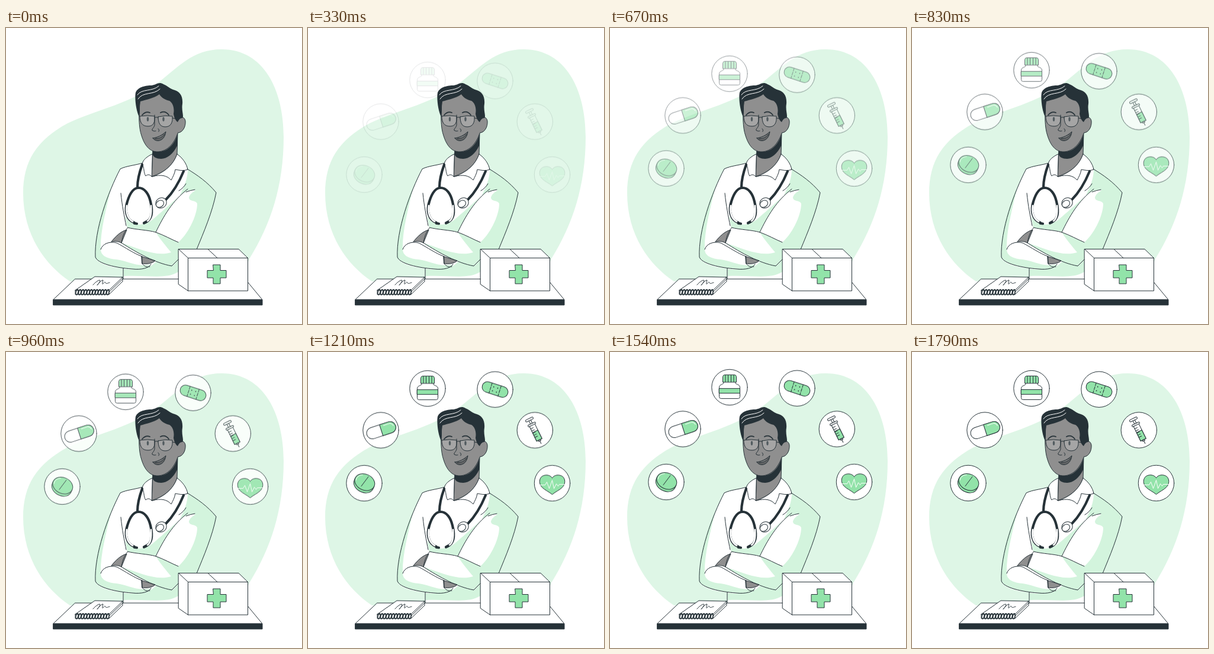
An HTML page that plays this animation: 500 by 500 pixels, repeating every 1.83 s.

```html
<!DOCTYPE html>
<html lang="en">
<head>
<meta charset="utf-8">
<title>Doctor</title>
<style>
  html, body { margin: 0; width: 100%; height: 100%; overflow: hidden; background: #fff; }
  svg { display: block; width: 100vw; height: 100vh; }
  .line { fill: none; stroke: #263238; stroke-width: 1; stroke-linecap: round; stroke-linejoin: round; }
  .white { fill: #fff; }
  .green { fill: #92e3a9; }
  .pale { fill: #def6e6; }
  .shade { fill: #d3f4dd; }
  .skin { fill: #8f8f8f; }
  .dark { fill: #263238; }
  .tube { fill: none; stroke: #263238; stroke-width: 4.2; stroke-linecap: round; }
  .thin { stroke: #fff; stroke-width: 2.6; }
  .thick { stroke-width: 1.8; }
  .shine { fill: none; stroke: #fff; stroke-width: 1; stroke-linecap: round; stroke-linejoin: round; }
  #icons { opacity: 0; }
</style>
</head>
<body>
<svg viewBox="0 0 500 500">
  <path class="pale" d="M108 428C66 400 29 349 29 279C29 225 52 189 104 161C150 139 219 125 260 90C289 68 315 36 364 36C436 36 469 105 469 184C469 267 447 332 411 390L395 430Z"/>

  <g id="icons">
    <g transform="translate(95 221.5)">
      <circle class="line white" r="30.2"/>
      <g transform="rotate(24)">
        <path class="line green" d="M-17.5 -2V2C-17 11 -8 15.500 1 15.500C10 15.500 17.500 10 17.500 2V-2Z"/>
        <ellipse class="line green" cy="-2" rx="17.500" ry="13.500"/>
      </g>
      <path class="line" d="M-5 5L7 -11"/>
      <path class="shine" d="M-14 -5C-13 -11 -8 -14 -3 -14"/>
    </g>

    <g transform="translate(123 132)">
      <circle class="line white" r="30.2"/>
      <g transform="translate(.7 0) rotate(-18)">
        <rect class="line white" x="-25.500" y="-9.700" width="51" height="19.400" rx="9.700"/>
        <path class="line green" d="M0 -9.700H15.800A9.700 9.700 0 0 1 15.800 9.700H0Z"/>
        <path class="shine" d="M6 -6.500H16C19 -6.500 21 -4 22 -1"/>
      </g>
    </g>

    <g transform="translate(202 61.500)">
      <circle class="line white" r="30.2"/>
      <path class="line white" d="M-10 -10H10V-7C10 -5 17.500 -5 17.500 0V16Q17.500 19 14.500 19H-14.500Q-17.500 19 -17.500 16V0C-17.500 -5 -10 -5 -10 -7Z"/>
      <path class="line green" d="M-17.500 2H17.500V10H-17.500Z"/>
      <path class="line green" d="M-11.500 -9V-18Q-11 -21 -8 -21H8Q11 -21 11.500 -18V-9Z"/>
      <path class="line" d="M-7 -20V-9M-2.500 -20V-9M2.500 -20V-9M7 -20V-9"/>
    </g>

    <g transform="translate(316 63.200)">
      <circle class="line white" r="30.2"/>
      <g transform="rotate(18)">
        <rect class="line green" x="-22.500" y="-9" width="45" height="18" rx="9"/>
        <path class="line" stroke-dasharray="5 2" d="M-8 -9V9M8 -9V9"/>
        <g class="dark"><circle cx="-3.500" cy="-3.500" r=".9"/><circle cx="3.500" cy="-3.500" r=".9"/><circle cx="-3.500" cy="3.500" r=".9"/><circle cx="3.500" cy="3.500" r=".9"/></g>
      </g>
    </g>

    <g transform="translate(383.300 132)">
      <circle class="line white" r="30.2"/>
      <g transform="translate(0 1) rotate(-26)">
        <path class="line white" d="M-1.700 -20H1.700V-11H-1.700Z"/>
        <rect class="line white" x="-7" y="-23" width="14" height="3.500" rx="1.700"/>
        <rect class="line white" x="-5" y="-11" width="10" height="28"/>
        <path class="line green" d="M-5 1H5V17H-5Z"/>
        <rect class="line white" x="-7" y="-13.500" width="14" height="3" rx="1.500"/>
        <path class="line" d="M-5 -6H0M-5 -2H0M-5 2H0M-5 6H0M-5 10H0M-2 17H2V19H-2ZM0 19V24"/>
      </g>
    </g>

    <g transform="translate(412.500 221.500)">
      <circle class="line white" r="30.2"/>
      <path class="line green" d="M0 -9C4 -15 13 -15 18 -11C23 -6 22 2 17 7C12 12 6 14 0 19C-6 14 -12 12 -17 7C-22 2 -23 -6 -18 -11C-13 -15 -4 -15 0 -9Z"/>
      <path class="shine" d="M-21 3H-12L-9 -2L-5 9L0 -5L3 9L7 1L10 5L12 2H21"/>
    </g>
  </g>

  <!-- coat -->
  <path class="white" d="M231 227C218 232 203 233 193 238C172 278 149 342 151 387C155 398 175 404 199 406L198 425H300V375H322C333 345 349 310 355 278C340 260 324 249 306 238L289 213L246 215Z"/>
  <path class="shade" d="M307 239C326 249 341 261 355 278C349 310 334 345 322 374H291V362C306 350 323 318 323 297C321 290 309 294 309 286C311 280 316 277 320 274C311 272 303 276 294 282C301 268 307 254 307 239Z"/>
  <path class="shade" d="M201 318C213 337 231 334 246 325C259 314 275 300 302 275C281 292 266 318 253 344L205 337Z"/>
  <path class="shade" d="M178 268C162 304 149 346 151 387C155 398 185 405 213 407C230 409 242 405 245 399C222 405 205 393 187 391C172 390 160 385 160 374C159 345 168 310 178 268Z"/>
  <path class="shade" d="M199 407C222 410 243 407 253 395L281 402L291 392V412C270 425 240 417 199 419Z"/>
  <path class="shade" d="M195 363C222 381 252 397 280 402L291 392V362L253 345C261 358 270 368 279 379C255 387 225 373 195 363Z"/>

  <!-- neck and collar -->
  <path class="skin line" d="M248 203L246 251C268 244 283 231 289 213L290 176Z"/>
  <path class="dark" d="M248 205C252 210 260 210 268 207C279 202 286 192 290 179L289 199C283 212 272 221 262 221C254 221 249 218 248 214Z"/>
  <path class="line white" d="M247 213C238 217 231 223 230 230C234 236 232 244 236 250C239 247 243 247 246 251Z"/>
  <path class="line white" d="M289 213C298 219 305 229 307 239C299 242 292 240 286 239C285 246 282 251 279 257C272 249 262 247 247 251C268 244 283 231 289 213Z"/>

  <!-- head -->
  <path class="line skin" d="M288 153C292 148 302 149 303 157C304 167 298 178 289 177Z"/>
  <path class="skin" d="M226 122C224 146 224 168 229 182C234 198 242 208 254 209C271 210 284 196 290 178L291 150L282 118L258 108Z"/>
  <path class="line" d="M226 125C224 146 224 168 229 182C234 198 242 208 254 209C271 210 284 196 290 178"/>
  <path class="dark" d="M225 150C220 141 217 119 219 109C223 99 237 97 246 97C254 96 258 90 266 95C272 97 276 102 282 104C294 107 299 115 298 128C296 139 301 149 298 152C294 152 292 155 290 159C286 156 284 151 283 145C285 134 281 126 276 123C268 121 262 117 259 112C249 119 237 121 227 124C225 132 227 142 225 150Z"/>
  <path class="shine" d="M222 113C229 102 247 108 258 98M223 120C231 107 249 114 260 103"/>
  <path class="line thick" d="M230 147Q236 140 243 143M261 143Q269 139 275 147"/>
  <g class="dark"><ellipse cx="239.500" cy="154" rx="1.700" ry="3.700"/><ellipse cx="266" cy="154" rx="1.700" ry="3.700"/></g>
  <g class="line" style="fill:#ffffff33">
    <path d="M226 149Q239 147 251 149C252 159 249 166 240 166C230 166 226 160 226 149Z"/>
    <path d="M257 150Q269 147 281 149C282 160 278 167 269 167C260 167 257 160 257 150Z"/>
  </g>
  <path class="line" d="M251 152Q254 149 257 152M281 152L290 154M251 147V164C250 169 246 170 247 173Q250 175 253 174M257 170Q260 172 258 175"/>
  <path class="line" style="fill:#626465" d="M248 186C256 185 264 181 270 175C269 184 264 190 257 190.500C253 190.500 250 189 248 186ZM252 187Q261 187 268 180"/>

  <!-- arms -->
  <path class="skin line" d="M178 361C184 353 194 343 204 341L195 363C189 360 184 360 178 361Z"/>
  <path class="skin line" d="M229 386L252 393C247 398 238 399 230 398Z"/>
  <path class="line" d="M231 228C218 232 203 233 193 238C172 278 149 342 151 387C155 398 185 405 213 407C230 409 242 405 245 399M230 386V398C233 402 238 405 243 403M160 374C163 364 175 360 187 363C202 371 216 381 230 386"/>
  <path class="line" d="M205 338C199 345 196 355 195 363C222 380 252 397 280 402L291 391M205 337C221 341 239 341 253 345C267 350 279 357 291 362M253 345C266 318 281 292 307 272M306 238C324 249 340 260 355 278C349 310 334 345 322 374M194 279C196 300 200 319 203 334M198 406V425M292 275Q300 270 304 263M304 277Q312 274 319 273"/>

  <!-- stethoscope -->
  <path class="tube" d="M230 231C226 242 222 256 222 269M300 242C293 259 283 277 270 290"/>
  <path class="tube" d="M217 329C203 324 200 308 205 293C209 280 215 270 224 270C234 270 241 280 244 293C248 309 247 323 236 328"/>
  <path class="tube thin" d="M214 327C205 322 202 311 204 300M245 300C246 312 245 322 239 326"/>
  <path class="tube" d="M217 330L221 330.500M233 329.500L236 328"/>
  <ellipse class="line white" cx="262" cy="295.500" rx="9.500" ry="8.500" transform="rotate(-35 262 295.500)"/>
  <ellipse class="line white" cx="260" cy="297" rx="7" ry="5.500" transform="rotate(-35 260 297)"/>

  <!-- table -->
  <path class="line white" d="M117 424H404L433 459H80Z"/>
  <path class="line dark" d="M80 459H433V468H80Z"/>

  <!-- notebook -->
  <path class="line white" d="M117 443V450H174L197 428V421Z"/>
  <path class="line white" d="M117 443L150 420L197 421L174 443Z"/>
  <path class="line" d="M174 443V450M174 446L197 424"/>
  <path class="line" d="M147 434C152 428 159 424 159 427C157 432 153 436 154 434C157 431 162 425 164 426C163 430 162 434 164 432C166 430 167 428 168 430C169 433 171 431 175 430"/>
  <g id="coils" class="line" style="stroke-width:1.500"></g>

  <!-- first aid box -->
  <path class="line white" d="M291.500 373.500H393L408.500 388.500V444H307.500L291.500 433Z"/>
  <path class="line" d="M291.500 373.500L307.500 388.500H408.500M307.500 388.500V444M341 373.500L357 388.500"/>
  <path class="line green" d="M350 400H362V409.500H372V422H362V432H350V422H340V409.500H350Z"/>
</svg>
<script>
  const LOOP = 1830, FRAMES = 44, HIDDEN = 4, RISE = 30;

  const coils = document.getElementById("coils");
  for (let i = 0; i < 12; i++) {
    const coil = document.createElementNS("http://www.w3.org/2000/svg", "ellipse");
    const x = 120 + i * 4.75;
    for (const [key, value] of Object.entries({ cx: x, cy: 446.3, rx: 1.9, ry: 4.6, transform: `rotate(12 ${x} 446)` }))
      coil.setAttribute(key, value);
    coils.append(coil);
  }

  const bezier = (a, b, s) => 3 * (1 - s) ** 2 * s * a + 3 * (1 - s) * s * s * b + s ** 3;

  // Ease with an overshoot near the end
  function ease(x) {
    let low = 0, high = 1;
    for (let i = 0; i < 30; i++) {
      const mid = (low + high) / 2;
      if (bezier(.36, .5, mid) < x) low = mid; else high = mid;
    }
    return bezier(-.01, 1.38, low);
  }

  // 24 pictures per second, times rounded to 10 ms
  const steps = Array.from({ length: FRAMES }, (_, i) => {
    const p = ease(i / (FRAMES - 1));
    return {
      offset: Math.round(i * 100 / 24) * 10 / LOOP,
      opacity: i < HIDDEN ? 0 : Math.min(1, Math.max(0, p)),
      transform: `translateY(${(RISE * (1 - p)).toFixed(3)}px)`,
      easing: "step-end"
    };
  });
  steps.push({ ...steps[FRAMES - 1], offset: 1 });

  document.getElementById("icons").animate(steps, { duration: LOOP, iterations: Infinity });
</script>
</body>
</html>
```
